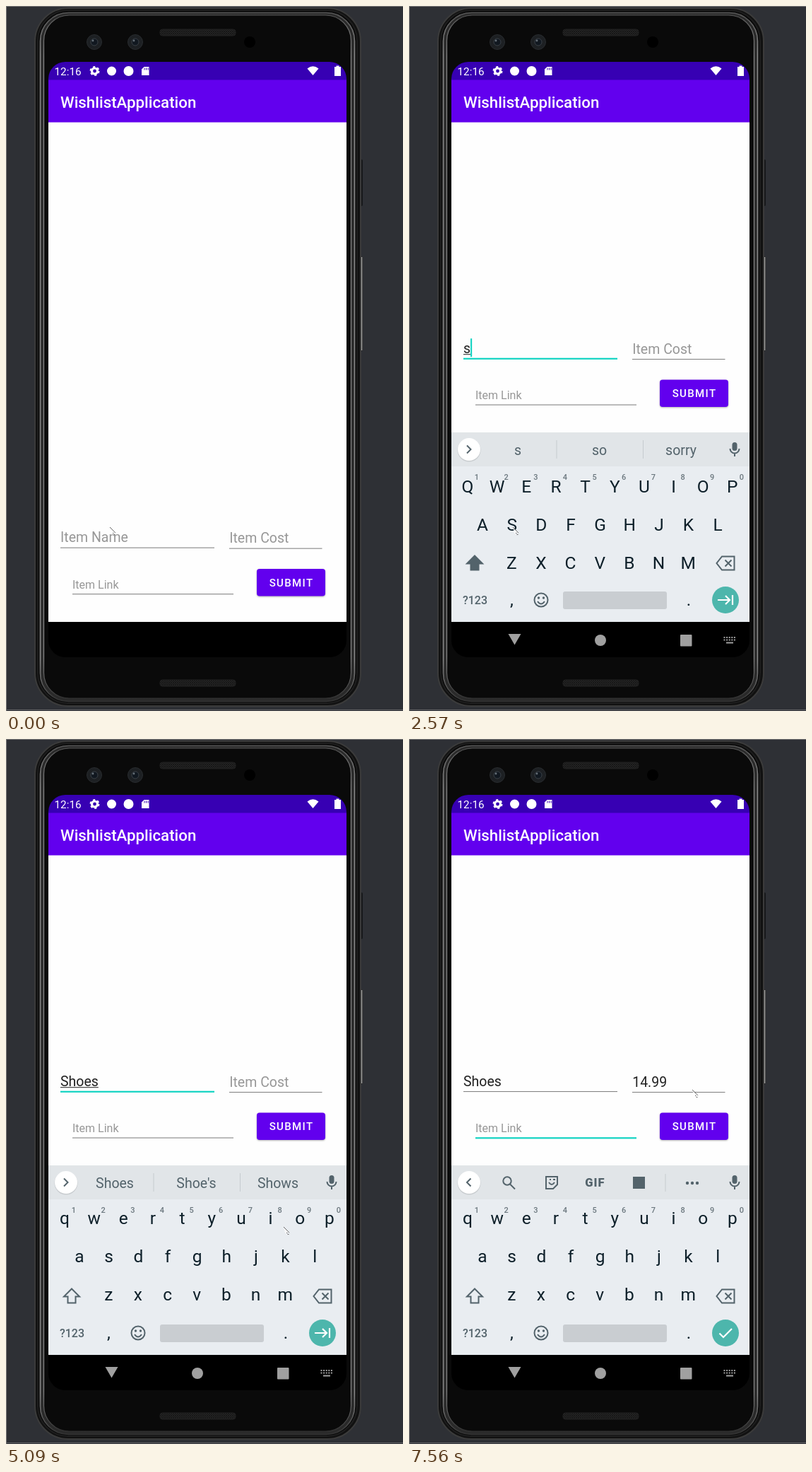
An HTML page that plays this animation: 562 by 997 pixels, repeating every 8000 ms.

```html
<!DOCTYPE html>
<html lang="en">
<head>
<meta charset="utf-8">
<title>Wishlist form</title>
<style>
html, body { margin: 0; width: 100%; height: 100%; overflow: hidden; background: #2e3035; }
svg { display: block; width: 562px; height: 997px; font-family: Roboto, sans-serif; }
.mid { text-anchor: middle; }
.hint { fill: #979797; }
.typed { fill: #212121; }
.key { fill: #0d1f29; font-size: 24.5px; text-anchor: middle; }
.digit { fill: #0d1f29; font-size: 33px; text-anchor: middle; }
.sup { fill: #6a767d; font-size: 11px; font-weight: 500; text-anchor: middle; }
.word { fill: #53636b; font-size: 19.5px; text-anchor: middle; }
.line { fill: none; stroke: #53636b; stroke-width: 2; }
.solid { fill: #53636b; }
.white { fill: none; stroke: #fff; stroke-width: 2.2; }
.button { fill: #6200ee; filter: drop-shadow(0 1.5px 1.2px rgba(0, 0, 0, .3)); }
</style>
</head>
<body>
<svg viewBox="0 0 562 997">
  <defs>
    <linearGradient id="rim" x1="0" y1="0" x2="0" y2="1">
      <stop offset="0" stop-color="#555"/><stop offset=".06" stop-color="#8a8a8a"/>
      <stop offset=".94" stop-color="#8a8a8a"/><stop offset="1" stop-color="#333"/>
    </linearGradient>
    <pattern id="mesh" width="3" height="3" patternUnits="userSpaceOnUse">
      <rect width="3" height="3" fill="#262626"/><path d="M0 0l3 3M3 0l-3 3" stroke="#111" stroke-width=".7"/>
    </pattern>
    <clipPath id="screen"><rect x="60" y="79" width="422" height="842" rx="24"/></clipPath>
    <clipPath id="above"><rect x="60" y="165" width="422" height="707"/></clipPath>
    <g id="erase">
      <path class="line" d="M-5 -9.500H12.500V9.500H-5L-12.500 0Z"/>
      <path class="line" d="M-.5 -4.500l9 9m0 -9l-9 9"/>
    </g>
    <g id="next">
      <circle r="19" fill="#4db6ac"/>
      <path class="white" d="M-11 0H6M0 -6l6 6l-6 6M10 -7V7"/>
    </g>
  </defs>

  <rect width="562" height="997" fill="#2e3035"/>
  <path d="M0 .5H562M.5 0V997" stroke="#777" fill="none"/>
  <path d="M0 995.500H562" stroke="#66676a"/>

  <rect x="500" y="217" width="5" height="66" rx="2" fill="#17181a"/>
  <rect x="500" y="354" width="5" height="134" rx="2" fill="#242424"/>
  <path d="M503.500 355V487" stroke="#aaa" stroke-width="1.500"/>
  <rect x="41" y="3" width="461" height="987" rx="47" fill="#111" stroke="#3b3b3b" stroke-width="2"/>
  <rect x="45" y="6" width="452" height="980" rx="43" fill="#0a0a0a" stroke="#1e1e1e" stroke-width="2"/>
  <rect x="48.500" y="9.500" width="445" height="974" rx="40" fill="#2a2a2a" stroke="url(#rim)" stroke-width="1.600"/>
  <rect x="53.500" y="13" width="435" height="966" rx="36" fill="#0a0a0a" stroke="url(#rim)" stroke-width="1.200"/>
  <rect x="218" y="33" width="107" height="9" rx="3.500" fill="url(#mesh)" stroke="#222"/>
  <rect x="218" y="953" width="107" height="9" rx="3.500" fill="url(#mesh)" stroke="#222"/>
  <g id="lenses"></g>
  <circle cx="345" cy="51" r="8" fill="#000"/>

  <g clip-path="url(#screen)">
    <rect x="60" y="79" width="422" height="842" fill="#000"/>
    <rect x="60" y="164" width="422" height="707" fill="#fefefe"/>
    <rect x="60" y="79" width="422" height="26" fill="#3700b3"/>
    <rect x="60" y="104.500" width="422" height="60" fill="#6200ee"/>
    <g fill="#fff">
      <text x="68.500" y="97.800" font-size="15.300">12:16</text>
      <text x="77" y="143.500" font-size="22.300" font-weight="500">WishlistApplication</text>
      <circle cx="125.500" cy="92" r="4" fill="none" stroke="#fff" stroke-width="3.200"/>
      <circle cx="125.500" cy="92" r="6" fill="none" stroke="#fff" stroke-width="2" stroke-dasharray="3.100 3.183"/>
      <circle cx="149.500" cy="92" r="6.500"/>
      <circle cx="173.500" cy="92" r="7"/>
      <path d="M195.500 86H202.500V98H192V89.500Z"/>
      <path d="M426.500 88.500Q434.500 82 442.500 88.500L434.500 98Z"/>
      <path d="M465 86h2.500v-1.500h4V86H474V99H465Z"/>
    </g>
    <path d="M196 87.500v3M198.500 87.500v3M201 87.500v3" stroke="#3700b3"/>

    <g id="form">
      <g id="fields"></g>
      <rect class="button" x="355" y="796" width="97" height="38.500" rx="4"/>
      <text x="404" y="821" class="mid" fill="#fff" font-size="15.040" font-weight="500" letter-spacing="1.340">SUBMIT</text>
    </g>

    <g clip-path="url(#above)">
      <g id="letters">
        <rect x="60" y="603" width="422" height="268" fill="#e9edf1"/>
        <rect x="60" y="603" width="422" height="48" fill="#e1e5e8"/>
        <circle cx="85" cy="628" r="16.500" fill="#c9cdd0"/>
        <circle cx="85" cy="627" r="16" fill="#fff"/>
        <path id="chevron" class="line"/>
        <rect class="solid" x="457.500" y="617" width="7" height="12" rx="3.500"/>
        <path class="line" d="M454.500 626a6.500 6.500 0 0 0 13 0M461 633v4" stroke-width="1.800"/>
        <g id="tools">
          <circle class="line" cx="139" cy="625" r="5.700"/>
          <path class="line" d="M143 629.500l7 7" stroke-width="2.500"/>
          <path class="line" d="M194 619H210V630L204 636H194Z"/>
          <path class="line" d="M198 627q4 6 8 0M199 623h2M204 623h3" stroke-width="1.700"/>
          <text class="mid solid" x="263.500" y="633" font-size="16.500" font-weight="800" letter-spacing="1">GIF</text>
          <rect class="solid" x="317" y="619" width="17" height="17"/>
          <path d="M363 615V640" stroke="#c6cbcf"/>
          <g class="solid"><circle cx="394" cy="628" r="2.200"/><circle cx="401" cy="628" r="2.200"/><circle cx="408" cy="628" r="2.200"/></g>
        </g>
        <g id="words">
          <path d="M209 614V640M331.500 614V640" stroke="#c6cbcf"/>
          <text class="word" x="154" y="635"></text>
          <text class="word" x="269.500" y="635"></text>
          <text class="word" x="385" y="635"></text>
        </g>
        <g id="keys"></g>
        <path id="shift" class="line" d="M93 777.500L104 788.500H98.500V797.500H87.500V788.500H82Z"/>
        <use href="#erase" x="448" y="788"/>
        <text x="93.500" y="846" class="mid solid" font-size="16" font-weight="500">?123</text>
        <text class="key" x="145.500" y="848">,</text>
        <text class="key" x="396" y="848">.</text>
        <circle class="line" cx="187" cy="840" r="9.500"/>
        <path class="line" d="M182 842q5 7 10 0"/>
        <g class="solid"><circle cx="183.500" cy="837" r="1.700"/><circle cx="190.500" cy="837" r="1.700"/></g>
        <rect x="218" y="828" width="147" height="25" rx="3" fill="#c9cdd1"/>
        <use id="goNext" href="#next" x="448" y="840"/>
        <g id="goDone">
          <circle cx="448" cy="840" r="19" fill="#4db6ac"/>
          <path class="white" d="M439.500 840.500l5.500 5.500l12 -12"/>
        </g>
      </g>
      <g id="numbers">
        <rect x="60" y="650.500" width="422" height="220.500" fill="#e9edf1"/>
        <path d="M421.500 685H434" stroke="#0d1f29" stroke-width="2.400"/>
        <path class="line" d="M416.500 734.500V740.500H438.500V734.500" stroke-width="2.200"/>
        <use href="#erase" x="427.500" y="791.500"/>
        <use href="#next" x="427.500" y="838.500"/>
      </g>
    </g>

    <g id="nav" fill="#a0a0a0">
      <path d="M140.500 888H158.500L149.500 903.500Z"/>
      <circle cx="271" cy="897" r="8"/>
      <rect x="384" y="889" width="16.500" height="16.500" rx="1"/>
      <path d="M445.500 893H462M445.500 896.500H462" stroke="#a0a0a0" stroke-width="1.800" stroke-dasharray="2 1.600"/>
      <path d="M449 900.500H459" stroke="#a0a0a0" stroke-width="1.800"/>
    </g>
  </g>

  <g id="pointer">
    <path d="M0 0L8 8L4.500 8L5 11L2 8Z" fill="#fff" opacity=".7"/>
    <path d="M0 0L8 8.200M4 8.500H5.500M5.500 10.500H7.500" stroke="#555" stroke-width=".9" fill="none"/>
  </g>
</svg>

<script>
const LOOP = 8000;
const $ = id => document.getElementById(id);

function add(parent, tag, attrs, text = '') {
  const node = document.createElementNS('http://www.w3.org/2000/svg', tag);
  for (const name in attrs) node.setAttribute(name, attrs[name]);
  node.textContent = text;
  return parent.appendChild(node);
}
const show = (node, on) => node.setAttribute('visibility', on ? 'inherit' : 'hidden');
const move = (node, x, y) => node.setAttribute('transform', `translate(${x} ${y})`);

for (const x of [125, 183]) {
  add($('lenses'), 'circle', { cx: x, cy: 51, r: 10.5, fill: '#1d2023', stroke: '#292c2f' });
  add($('lenses'), 'circle', { cx: x, cy: 51, r: 5, fill: '#111820', stroke: '#3a4046' });
  add($('lenses'), 'circle', { cx: x - 2, cy: 49, r: 1.4, fill: '#68727a' });
}

const letterNodes = [];
[['qwertyuiop', 83, 686], ['asdfghjkl', 104, 740], ['zxcvbnm', 145.3, 794]].forEach(([row, left, y], r) => {
  [...row].forEach((char, i) => {
    const x = left + i * 41.65;
    letterNodes.push({ char, y, node: add($('keys'), 'text', { class: 'key', x, y }, char) });
    if (!r) add($('keys'), 'text', { class: 'sup', x: x + 13, y: 670 }, (i + 1) % 10);
  });
});

['123', '456', '789', ',0.'].forEach((row, r) => [...row].forEach((char, c) =>
  add($('numbers'), 'text', { class: 'digit', x: 114 + c * 104.5, y: 696.5 + r * 53.5 }, char)));

function makeField(hint, x, baseline, left, right, lineY, size) {
  const parent = $('fields');
  return {
    hint, x,
    text: add(parent, 'text', { x, y: baseline, 'font-size': size }),
    mark: add(parent, 'rect', { x, y: baseline + 1.5, height: 1, fill: '#212121' }),
    line: add(parent, 'rect', { x: left, width: right - left }),
    lineY,
    caret: add(parent, 'rect', { y: baseline - 20.5, width: 2.1, height: 26, fill: '#12d3c2' })
  };
}
const fields = {
  name: makeField('Item Name', 77, 758.3, 77, 295, 766, 19.5),
  cost: makeField('Item Cost', 316.2, 759.2, 316, 447.5, 767, 19.5),
  link: makeField('Item Link', 94, 824, 94, 322, 831.5, 16)
};

// Each step lists only what changes.
const first = { name: '', cost: '', link: '', composing: true, lit: '', caret: '', pad: '', lift: 0,
  nav: false, caps: false, words: '', drop: 0, done: false, at: [147, 737] };
const steps = [
  [0, {}],
  [590, { lit: 'name' }],
  [710, { caret: 'name' }],
  [860, { nav: true }],
  [1010, { pad: 'letters', lift: 267.6, drop: 1 }],
  [1130, { drop: 0 }],
  [1280, { caret: '' }],
  [1740, { caret: 'name' }],
  [2330, { name: 's' }],
  [2450, { words: 's so sorry' }],
  [2570, { caps: true }],
  [2720, { name: 'sHo', caps: false, words: 'sHo Show Shoes' }],
  [3240, { name: 'sHoe', words: 'sHoe Shoe Shoes' }],
  [3360, { name: 'sHoes', words: 'sHoes Shoes Shows' }],
  [3480, { name: 'sHoe', words: 'sHoe Shoe Shoes' }],
  [3630, { name: 's', words: 's so sorry' }],
  [3780, { name: '' }],
  [3900, { words: '' }],
  [4300, { name: 'S', words: 'S So Sorry' }],
  [4420, { name: 'Sho', words: 'Sho Show Shot' }],
  [4570, { name: 'Shoe', words: 'Shoe Shoes Show' }],
  [4690, { name: 'Shoes', words: "Shoes Shoe's Shows" }],
  [4940, { at: [327, 675] }],
  [5090, { caret: '', at: [393, 690] }],
  [5210, { at: [445, 575] }],
  [5330, { at: [407, 485] }],
  [5610, { caret: 'name', at: [405, 493] }],
  [5760, { lit: 'name cost', caret: 'name cost' }],
  [5910, { pad: 'numbers', lift: 220.4, lit: 'cost', caret: 'cost', composing: false, words: '' }],
  [6150, { cost: '1' }],
  [6300, { cost: '14' }],
  [6550, { cost: '14.' }],
  [6860, { cost: '14.9' }],
  [6980, { cost: '14.99' }],
  [7440, { pad: 'letters', lift: 267.6, lit: 'link', caret: '', done: true, at: [401, 496] }]
];
let current = first;
const states = steps.map(([time, change]) => [time, current = { ...current, ...change }]);

function drawField(key, state) {
  const f = fields[key], value = state[key], lit = state.lit.includes(key);
  f.text.textContent = value || f.hint;
  f.text.setAttribute('class', value ? 'typed' : 'hint');
  const width = value ? f.text.getComputedTextLength() : 0;
  f.mark.setAttribute('width', width);
  show(f.mark, key === 'name' && value && state.composing);
  f.caret.setAttribute('x', f.x + width);
  show(f.caret, state.caret.includes(key));
  f.line.setAttribute('y', f.lineY - (lit ? .7 : .4));
  f.line.setAttribute('height', lit ? 2.2 : 1.1);
  f.line.setAttribute('fill', lit ? '#12d3c2' : '#858585');
}

function draw(state) {
  Object.keys(fields).forEach(key => drawField(key, state));
  move($('form'), 0, -state.lift);
  move($('letters'), 0, state.drop);
  move($('pointer'), ...state.at);
  show($('letters'), state.pad === 'letters');
  show($('numbers'), state.pad === 'numbers');
  show($('nav'), state.nav);
  show($('tools'), !state.words);
  show($('words'), state.words);
  show($('goNext'), !state.done);
  show($('goDone'), state.done);
  const words = state.words.split(' ');
  $('words').querySelectorAll('text').forEach((node, i) => node.textContent = words[i] || '');
  $('chevron').setAttribute('d', state.words ? 'M82 621.500l5.500 5.500l-5.500 5.500' : 'M87.500 621.500l-5.500 5.500l5.500 5.500');
  $('shift').style.fill = state.caps ? '#53636b' : 'none';
  for (const { char, y, node } of letterNodes) {
    node.textContent = state.caps ? char.toUpperCase() : char;
    node.setAttribute('y', state.caps ? y + 1.5 : y);
  }
}

const start = performance.now();
let shown = null;
function tick() {
  const time = (performance.now() - start) % LOOP;
  const state = states.findLast(([from]) => from <= time)[1];
  if (state !== shown) draw(shown = state);
  requestAnimationFrame(tick);
}
tick();
</script>
</body>
</html>
```
